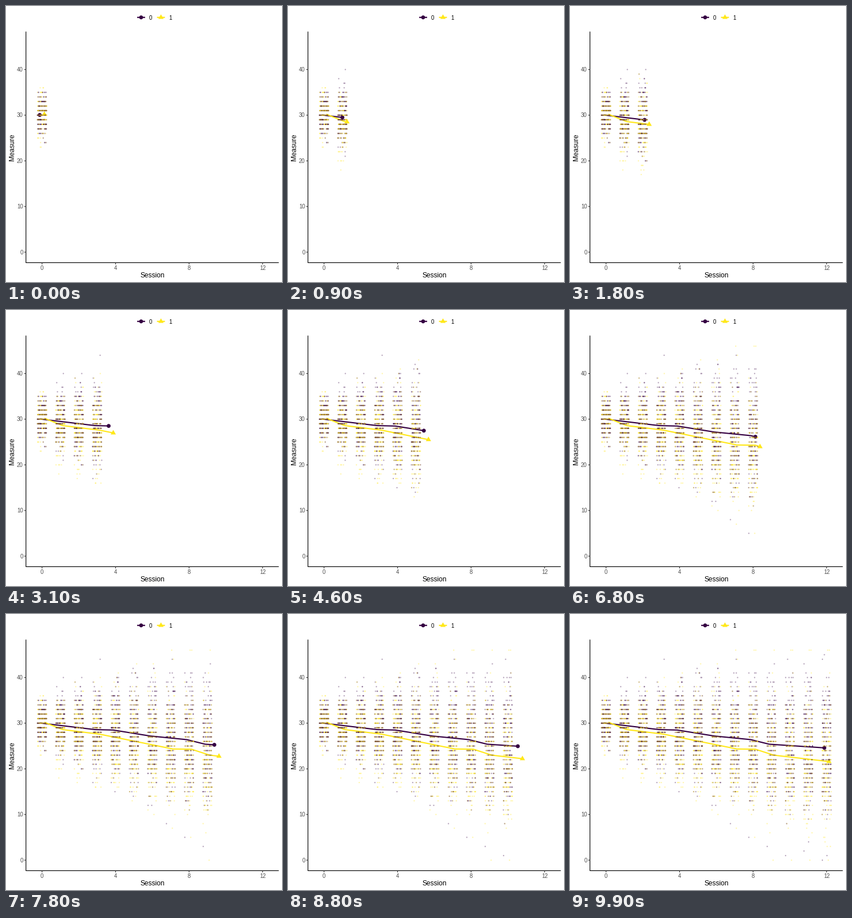
Animation of 480 by 480 pixels, one loop 10 s. Source, as a matplotlib script:

```python
import numpy as np
import matplotlib.pyplot as plt
from matplotlib.animation import FuncAnimation
from matplotlib.patches import Circle, Polygon

SIZE, FRAMES, STEP_MS = 480, 100, 100
PT = 0.72  # points per pixel at 100 dpi
COLORS = ("#350042", "#ffe81a")
DODGE = (-4.0, 4.0)
LEFT, RIGHT, TOP, BOTTOM = 34.7, 474.4, 44.5, 446.4

SESSIONS = np.arange(13)
KEYS = np.round(SESSIONS * (FRAMES - 1) / 12)  # frame at which a session is reached

# Group means bend only at these sessions
MEANS = (
    np.interp(SESSIONS, (0, 3, 4, 6, 8, 9, 12), (30.05, 28.6, 28.5, 27.2, 26.4, 25.4, 24.6)),
    np.interp(SESSIONS, (0, 1, 3, 7, 8, 9, 12), (30.2, 28.6, 27.6, 24.35, 24.3, 23.0, 21.6)),
)
SPREAD = np.sqrt(6 + 4.8 * SESSIONS)

plt.rcParams["font.family"] = "Liberation Sans"


def px(session):
    return LEFT + 27.95 + 31.97 * np.asarray(session)


def py(value):
    return BOTTOM - 18.3 - 7.94 * np.asarray(value)


def make_scores(subjects):
    """Random walks around the group means, one fixed jitter per subject."""
    rng = np.random.default_rng(12)
    group = rng.permutation(np.arange(subjects) % 2)
    jitter = rng.uniform(-8, 8, subjects)
    steps = np.sqrt(np.diff(SPREAD ** 2, prepend=0))
    walks = (rng.normal(size=(subjects, SESSIONS.size)) * steps).cumsum(axis=1)
    for g in (0, 1):
        part = walks[group == g]
        walks[group == g] = (part - part.mean(0)) / part.std(0) * SPREAD + MEANS[g]
    return group, jitter, np.clip(np.round(walks), 0, 46)


fig = plt.figure(figsize=(4.8, 4.8), dpi=100, facecolor="white")
ax = fig.add_axes([0, 0, 1, 1])
ax.set(xlim=(0, SIZE), ylim=(SIZE, 0))
ax.axis("off")


def line(xs, ys, color="black", width=1.16, z=1, cap="butt"):
    return ax.plot(xs, ys, color=color, lw=width * PT, zorder=z,
                   solid_capstyle=cap, snap=False)[0]


def label(x, y, s, size=9.6, color="black", ha="center", **kw):
    ax.text(x, y, s, fontsize=size * PT, color=color, ha=ha, va="baseline", **kw)


def triangle(x, y, r=5.3):
    return [(x, y - r), (x + 0.866 * r, y + r / 2), (x - 0.866 * r, y + r / 2)]


def add_marker(g, x, y):
    shape = Polygon(triangle(x, y), closed=True) if g else Circle((x, y), 3.4)
    shape.set(facecolor=COLORS[g], linewidth=0, zorder=3)
    return ax.add_patch(shape)


# Axes
line([LEFT, LEFT, RIGHT], [TOP, BOTTOM, BOTTOM])
for v in range(0, 41, 10):
    line([LEFT - 3, LEFT], [py(v)] * 2, "#333333")
    label(29.7, py(v) + 3.5, str(v), color="#4d4d4d", ha="right")
for s in range(0, 13, 4):
    line([px(s)] * 2, [BOTTOM, BOTTOM + 3], "#333333")
    label(px(s), 459.4, str(s), color="#4d4d4d")
label(254.7, 472, "Session", 12)
label(14.4, 245.3, "Measure", 12, rotation=90, rotation_mode="anchor")

# Legend
for g, x in enumerate((235, 269.5)):
    line([x - 6.9, x + 6.9], [19.8, 19.8], COLORS[g], 2.13, 2)
    add_marker(g, x, 19.8)
    label(x + 16.8, 23.6, str(g))

# Group means
trails = [line([], [], c, 2.13, 2) for c in COLORS]
heads = [add_marker(g, 0, 0) for g in (0, 1)]

# Single measurements
group, jitter, scores = make_scores(400)
columns = [
    ax.scatter(px(k) + jitter, py(scores[:, k]), s=(2.35 * PT) ** 2,
               c=[COLORS[g] for g in group], alpha=0.35, linewidths=0, zorder=4)
    for k in SESSIONS
]


def update(frame):
    now = np.interp(frame, KEYS, SESSIONS)
    xs = np.append(SESSIONS[KEYS < frame], now)
    for key, column in zip(KEYS, columns):
        column.set_visible(key <= frame)
    for g in (0, 1):
        x = px(xs) + DODGE[g]
        y = py(np.interp(xs, SESSIONS, MEANS[g]))
        trails[g].set_data(x, y)
        if g:
            heads[g].set_xy(triangle(x[-1], y[-1]))
        else:
            heads[g].center = (x[-1], y[-1])
    return [*trails, *heads, *columns]


anim = FuncAnimation(fig, update, frames=FRAMES, interval=STEP_MS,
                     repeat=True, repeat_delay=0, blit=False)
plt.show()
```
